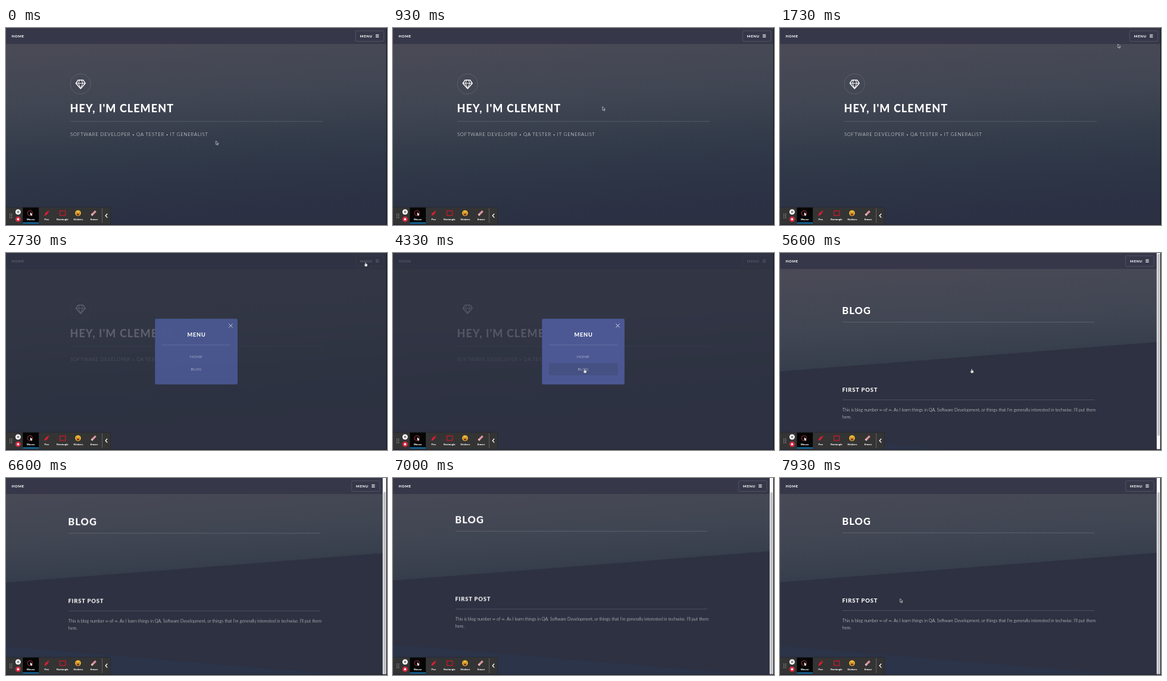
Animation of 640x332 px, one loop 8 s. Source, as an HTML page:

```html
<!DOCTYPE html>
<html lang="en">
<head>
<meta charset="utf-8">
<title>Portfolio walkthrough</title>
<style>
  html, body { margin: 0; width: 100%; height: 100%; overflow: hidden; background: #2e3141; }
  svg { display: block; width: 100vw; height: 100vh; }
  text { font-family: Lato, "Open Sans", sans-serif; fill: #fff; white-space: pre; }
  .bold { font-weight: 800; }
  .light { font-weight: 300; }
  .mid { text-anchor: middle; }
  .nav { font-size: 6px; letter-spacing: .65px; font-weight: 800; }
  .link { font-size: 6.4px; letter-spacing: .4px; font-weight: 300; }
  .body { font-size: 7.18px; font-weight: 300; }
  .dot { font-size: 5.4px; }
  .tool { font: 700 4.4px Roboto, "Open Sans", sans-serif; text-anchor: middle; }
  .rule { stroke: #fff; stroke-opacity: .25; stroke-width: .6; }
  .line { fill: none; stroke: #fff; }
</style>
</head>
<body>
<svg viewBox="0 0 640 332">
  <defs>
    <linearGradient id="sky" gradientUnits="userSpaceOnUse" x1="300" y1="20" x2="320" y2="332">
      <stop offset="0" stop-color="#494a56"/>
      <stop offset=".3" stop-color="#414653"/>
      <stop offset=".58" stop-color="#323b4a"/>
      <stop offset=".8" stop-color="#2c3445"/>
      <stop offset="1" stop-color="#2b3043"/>
    </linearGradient>
  </defs>

  <g id="home">
    <rect width="640" height="332" fill="url(#sky)"/>
    <circle class="line" cx="125.2" cy="94.2" r="17" stroke-opacity=".14" stroke-width=".9"/>
    <g class="line" stroke-linejoin="round">
      <path stroke-width="1.5" d="M121 87.8H129.6L133.2 93.2L125.3 102.3L117.4 93.2Z"/>
      <path stroke-width="1" d="M117.4 93.2H133.2M121.8 93.2L125.3 102L128.8 93.2M121.8 93.2L123.4 88M128.8 93.2L127.2 88"/>
    </g>
    <text class="bold" x="107.5" y="142" font-size="18" letter-spacing="1.05">HEY, I'M CLEMENT</text>
    <path class="rule" d="M108 157.3H532"/>
    <text class="light" x="107.9" y="182.3" font-size="7.8" letter-spacing=".8">SOFTWARE DEVELOPER <tspan class="dot" dy="-.8">•</tspan><tspan dy=".8"> QA TESTER </tspan><tspan class="dot" dy="-.8">•</tspan><tspan dy=".8"> IT GENERALIST</tspan></text>
  </g>

  <g id="blog">
    <rect width="640" height="332" fill="#2e3141"/>
    <g id="page">
      <path d="M0 0H640V149.5L0 199.5Z" fill="url(#sky)"/>
      <path d="M0 307L640 361V400H0Z" fill="#2c3449"/>
      <text class="bold" x="104.2" y="103" font-size="16.5" letter-spacing="1.1">BLOG</text>
      <path class="rule" d="M105 116.5H528"/>
      <text class="bold" x="104.4" y="233.6" font-size="9.5" letter-spacing=".8">FIRST POST</text>
      <path class="rule" d="M105 247.5H528"/>
      <text class="body" x="104.8" y="266.9">This is blog number ∞ of ∞. As I learn things in QA, Software Development, or things that I’m generally interested in techwise. I’ll put them</text>
      <text class="body" x="104.8" y="279.4">here.</text>
    </g>
  </g>

  <rect width="640" height="27" fill="#36384a"/>
  <text class="nav" x="9.4" y="15.6">HOME</text>
  <g id="menuButton">
    <rect class="line" x="587.3" y="4.8" width="47.4" height="17.6" rx="1.8" stroke-opacity=".18" stroke-width=".8"/>
    <text class="nav" x="594.8" y="15.6">MENU</text>
    <path class="line" stroke-width="1" d="M621 11.3H626.3M621 13.4H626.3M621 15.5H626.3"/>
  </g>

  <rect id="shade" width="640" height="332" fill="#2e3141" fill-opacity=".82"/>
  <g id="panel">
    <rect x="250.3" y="110.8" width="138.6" height="110.6" rx="2" fill="#4b5893"/>
    <path class="line" stroke-width=".8" d="M374.5 119.5L380.5 125.5M380.5 119.5L374.5 125.5"/>
    <text class="bold mid" x="320" y="141" font-size="9.2" letter-spacing=".8">MENU</text>
    <path class="rule" d="M262 155H377.5"/>
    <rect id="homeRow" x="262" y="165" width="115.5" height="20.5" rx="2" fill="#2e3141" fill-opacity=".18"/>
    <rect id="blogRow" x="262" y="185.5" width="115.5" height="20.5" rx="2" fill="#2e3141" fill-opacity=".18"/>
    <text class="link mid" x="319.6" y="177.1">HOME</text>
    <text class="link mid" x="319.6" y="197.8">BLOG</text>
  </g>

  <g id="scrollbar">
    <rect x="632.8" width="6" height="332" fill="#f8f8f8"/>
    <rect id="thumb" x="634" y="1" width="3.8" height="307" rx="1.9" fill="#c1c1c3"/>
  </g>
  <rect x="638.9" width="1.1" height="332" fill="#12131a"/>
  <rect y="330.6" width="640" height="1.4" fill="#252733"/>

  <g id="toolbar">
    <path d="M0 302.4H173Q175.3 302.4 175.3 304.7V330.6H0Z" fill="#343434" stroke="#15161c" stroke-opacity=".35" stroke-width="1.4" paint-order="stroke"/>
    <path stroke="#bbb" stroke-width="1.2" stroke-dasharray="1.2 1.8" d="M6.6 313V320.4M9.6 313V320.4"/>
    <circle cx="20.3" cy="310" r="4.5" fill="#fff"/>
    <path stroke="#333" stroke-width="1" d="M19.2 308V312M21.4 308V312"/>
    <circle cx="20.3" cy="322.3" r="4.5" fill="#d8283f"/>
    <rect x="18.7" y="320.7" width="3.2" height="3.2" fill="#fff"/>
    <rect x="28.3" y="302.6" width="26.8" height="27.4" fill="#050505"/>
    <rect x="28.3" y="327.8" width="26.8" height="1.6" fill="#1d9bea"/>
    <circle cx="40.3" cy="312" r="4.1" fill="none" stroke="#c83a48" stroke-width=".9"/>
    <path d="M40.8 310.6V316L42 315L42.9 317L43.8 316.6L43 314.6H44.7Z" fill="#fff"/>
    <path d="M64.4 316.4L65.3 313L69 309L71.3 311.3L67.8 315.3ZM69.7 308.3L70.6 307.5L72.9 309.7L72 310.6Z" fill="#dc1f35"/>
    <rect x="90.6" y="308.3" width="9.2" height="7.6" fill="none" stroke="#d3172c" stroke-width="1.2"/>
    <circle cx="121" cy="312" r="4.8" fill="#fcc235"/>
    <path d="M118 312.5H124Q123.5 316 121 316T118 312.5Z" fill="#843c20"/>
    <path d="M118.3 310.6H120M122 310.6H123.7" stroke="#5a321c" stroke-width="1"/>
    <g transform="rotate(-45 147.2 312)">
      <rect x="142.2" y="310.3" width="10" height="3.4" rx=".8" fill="#d9929e"/>
      <rect x="142.2" y="310.3" width="2.4" height="3.4" rx=".8" fill="#e9bcc3"/>
    </g>
    <path stroke="#777" stroke-width=".7" d="M161.6 304V328.5"/>
    <path class="line" stroke-width="1.3" d="M170.2 313L167.2 316.3L170.2 319.6"/>
  </g>

  <g id="cursor">
    <path id="arrow" d="M0 0V6L1.4 4.8L2.4 7L3.5 6.5L2.5 4.4H4.3Z" fill="#15161c" stroke="#fff" stroke-width=".7"/>
    <path id="hand" d="M-.7 .6Q0 -.5 .7 .6V2.6L2.6 3Q3.3 3.2 3.1 4.4L2.6 7H-.8L-2.4 4.4Q-2.6 3.4 -1.6 3.8L-.7 4.6Z" fill="#fff" stroke="#222" stroke-width=".35"/>
  </g>
</svg>
<script>
const LOOP = 8000;
const HOLD = 'steps(1, end)';
const byId = id => document.getElementById(id);

// rows: [ms, value, easing]; the first and last values are held to the loop's ends
function play(id, prop, rows, format = v => v) {
  const all = [...rows];
  if (all[0][0] > 0) all.unshift([0, all[0][1]]);
  if (all.at(-1)[0] < LOOP) all.push([LOOP, all.at(-1)[1]]);
  const frames = all.map(([ms, value, easing = 'linear']) =>
    ({ offset: ms / LOOP, [prop]: format(value), easing }));
  byId(id).animate(frames, { duration: LOOP, iterations: Infinity });
}
const move = ([x, y]) => `translate(${x}px, ${y}px)`;
const moveY = y => `translateY(${y}px)`;
const moveX = x => `translateX(${x}px)`;

// Hard switch: visible only within the given spans
function showDuring(id, ...spans) {
  const rows = spans.flatMap(([from, to]) => [[from, 1, HOLD], [to, 0, HOLD]]);
  if (rows[0][0] > 0) rows.unshift([0, 0, HOLD]);
  play(id, 'opacity', rows);
}

const OPEN = 2480, CLOSE = 4480, FADE = 350, LOAD = 5300;

for (const id of ['shade', 'panel']) {
  play(id, 'opacity', [[OPEN, 0, 'ease'], [OPEN + FADE, 1], [CLOSE, 1, 'ease'], [CLOSE + FADE, 0]]);
}
play('panel', 'transform',
  [[OPEN, -12, 'ease-out'], [OPEN + 240, 0], [CLOSE, 0, 'ease'], [CLOSE + FADE, -12]], moveY);

showDuring('blog', [LOAD, LOOP]);
showDuring('scrollbar', [LOAD, LOOP]);
play('menuButton', 'transform', [[0, 0, HOLD], [LOAD, -6.8]], moveX);

// The page overshoots its end by a few pixels, then settles back
play('page', 'transform',
  [[6200, 0, 'ease-in-out'], [6650, -24, 'ease-out'], [6900, -26.7], [7020, -26.7, 'ease-out'], [7350, -24]], moveY);
play('thumb', 'transform', [[6200, 0, 'ease-in-out'], [6650, 23]], moveY);

showDuring('homeRow', [3810, 4080]);
showDuring('blogRow', [4080, CLOSE + FADE]);
showDuring('hand', [1960, 2900], [3810, 5750]);
showDuring('arrow', [0, 1960], [2900, 3810], [5750, LOOP]);

play('cursor', 'transform', [
  [60, [352.6, 190.3], 'ease-in'],
  [860, [349, 134], 'ease-in-out'],
  [1700, [567.3, 27.2], 'ease-in-out'],
  [2200, [604, 15.6]],
  [2740, [604, 15.6], 'ease-in-out'],
  [3460, [350, 124], 'ease-in-out'],
  [3850, [322, 170], 'linear'],
  [4250, [322, 195.2]],
  [5700, [322, 195.2], 'ease-in'],
  [6350, [235, 342]],
  [7150, [198, 342], 'ease-out'],
  [7730, [201.5, 204.5]],
  [7920, [201.8, 203.4]],
], move);

const svg = document.querySelector('svg');
['Mouse', 'Pen', 'Rectangle', 'Stickers', 'Eraser'].forEach((name, i) => {
  const label = document.createElementNS(svg.namespaceURI, 'text');
  label.setAttribute('class', 'tool');
  label.setAttribute('x', 41.6 + i * 26.6);
  label.setAttribute('y', 323.7);
  label.textContent = name;
  byId('toolbar').append(label);
});
</script>
</body>
</html>
```
